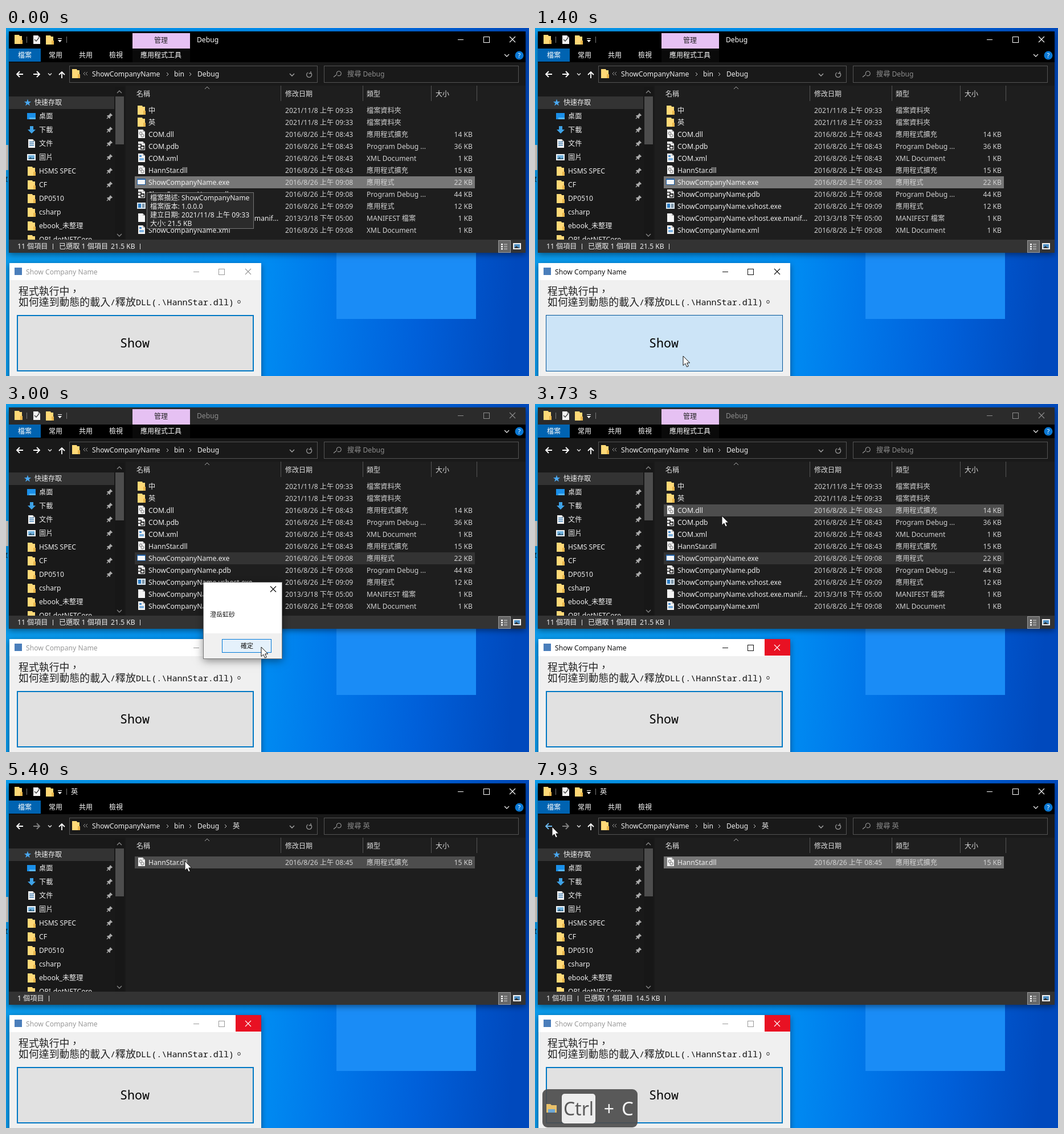
These frames come from a looping animation (918 by 610 pixels, 8 s). An HTML page with a canvas:

```html
<!DOCTYPE html>
<html lang="zh-Hant">
<head>
<meta charset="utf-8">
<title>Show Company Name</title>
<style>
html, body { margin: 0; width: 100%; height: 100%; overflow: hidden; background: #0078d7; }
canvas { display: block; }
</style>
</head>
<body>
<canvas id="stage" width="918" height="610"></canvas>
<script>
const ctx = document.getElementById('stage').getContext('2d');
const CJK = '"Noto Sans CJK TC", "Noto Sans CJK JP", "Noto Sans CJK", sans-serif';
const SANS = '"Noto Sans", ' + CJK;
const MONO = '"Noto Sans Mono", monospace';
const LOOP = 8000;

// ---------- drawing helpers ----------
function rect(x, y, w, h, color) {
  ctx.fillStyle = color;
  ctx.fillRect(x, y, w, h);
}
function outline(x, y, w, h, color, line = 1) {
  ctx.strokeStyle = color;
  ctx.lineWidth = line;
  ctx.strokeRect(x + line / 2, y + line / 2, w - line, h - line);
}
function rounded(x, y, w, h, r, color) {
  ctx.fillStyle = color;
  ctx.beginPath();
  ctx.roundRect(x, y, w, h, r);
  ctx.fill();
}
function disc(x, y, r, color) {
  ctx.fillStyle = color;
  ctx.beginPath();
  ctx.arc(x, y, r, 0, 7);
  ctx.fill();
}
function text(str, x, y, color = '#eee', size = 12.15, align = 'left', family = SANS) {
  ctx.font = `${size}px ${family}`;
  ctx.textAlign = align;
  ctx.fillStyle = color;
  ctx.fillText(str, x, y);
}
function at(x, y, draw) {
  ctx.save();
  ctx.translate(x, y);
  draw();
  ctx.restore();
}
function stroke(x, y, d, color, line = 1) {
  at(x, y, () => {
    ctx.strokeStyle = color;
    ctx.lineWidth = line;
    ctx.stroke(new Path2D(d));
  });
}
function fill(x, y, d, color) {
  at(x, y, () => {
    ctx.fillStyle = color;
    ctx.fill(new Path2D(d));
  });
}
function shadowed(x, y, w, h, color, blur = 10) {
  ctx.save();
  ctx.shadowColor = 'rgba(0,0,0,.45)';
  ctx.shadowBlur = blur;
  ctx.shadowOffsetY = 3;
  rect(x, y, w, h, color);
  ctx.restore();
}
const chevron = { down: 'M-4-2L0 2L4-2', up: 'M-4 2L0-2L4 2', right: 'M-2-3L1 0L-2 3' };

function windowButtons(xMin, xMax, xClose, y, color, closeColor = color) {
  stroke(xMin, y, 'M-5 .5H5', color);
  outline(xMax - 5, y - 5, 11, 11, color);
  stroke(xClose, y, 'M-5-5L5 5M5-5L-5 5', closeColor, 1.1);
}

// ---------- icons, placed by their top left corner (about 14 x 16) ----------
const page = (x, y) => {
  fill(x, y, 'M1 0H9L13 4V15H1Z', '#f4f4f4');
  fill(x, y, 'M9 0V4H13Z', '#b5b5b5');
};
const icons = {
  folder(x, y) {
    fill(x, y, 'M0 0H8L9 2H13V16H0Z', '#ffd977');
    fill(x, y, 'M10 9H14V16H10Z', '#e9b64d');
  },
  page,
  dll(x, y) {
    page(x, y);
    ctx.strokeStyle = '#999';
    ctx.lineWidth = 1.4;
    for (const [cx, cy, r] of [[5.5, 6.5, 2.2], [8.5, 10.5, 2.4]]) {
      ctx.beginPath();
      ctx.arc(x + cx, y + cy, r, 0, 7);
      ctx.stroke();
    }
  },
  pdb(x, y) {
    page(x, y);
    outline(x - 1, y + 4, 8, 7, '#222', 1.5);
    rect(x + 5, y + 7, 7, 7, '#222');
    rect(x + 6.5, y + 9, 4, 3.5, '#eee');
  },
  xml(x, y) {
    page(x, y);
    rect(x + 3, y + 3, 4, 3, '#4a8fd0');
    rect(x + 3, y + 8, 8, 4, '#7eb2e0');
  },
  exe(x, y) {
    rect(x - 1, y + 2, 15, 11, '#1d5fa8');
    rect(x, y + 4, 13, 8, '#f6f8fa');
  },
  host(x, y) {
    rect(x - 1, y + 2, 15, 11, '#d7e4ee');
    rect(x + 1, y + 4, 5, 7, '#2b7cc4');
    rect(x + 8, y + 4, 4, 7, '#7c93a5');
  },
  desk(x, y) {
    rect(x - 1, y + 2, 15, 11, '#1a8fe8');
    rect(x + 3, y + 10, 11, 3, '#56b6f7');
  },
  down(x, y) { fill(x, y, 'M4 1H10V7H14L7 14L0 7H4Z', '#3ea2e6'); },
  doc(x, y) {
    page(x, y);
    for (const row of [4, 7, 10]) rect(x + 3, y + row, 8, 1.5, '#4a86b8');
  },
  pic(x, y) {
    rect(x - 1, y + 2, 15, 11, '#eef4f8');
    rect(x + 1, y + 4, 11, 7, '#6fb0dd');
    fill(x, y, 'M1 11L5 7L8 10L10 8L12 11Z', '#34607c');
  }
};

// ---------- content ----------
const sidebar = [
  ['desk', '桌面'], ['down', '下載'], ['doc', '文件'], ['pic', '圖片'], ['folder', 'HSMS SPEC'],
  ['folder', 'CF'], ['folder', 'DP0510'], ['folder', 'csharp'], ['folder', 'ebook_未整理'], ['folder', 'QPI-dotNETCore']
];
const LIB = '應用程式擴充', DIR = '檔案資料夾', APP = '應用程式', DBG = 'Program Debug ...', XML = 'XML Document';
const debugFiles = [
  ['folder', '中', '2021/11/8 上午 09:33', DIR, ''],
  ['folder', '英', '2021/11/8 上午 09:33', DIR, ''],
  ['dll', 'COM.dll', '2016/8/26 上午 08:43', LIB, '14 KB'],
  ['pdb', 'COM.pdb', '2016/8/26 上午 08:43', DBG, '36 KB'],
  ['xml', 'COM.xml', '2016/8/26 上午 08:43', XML, '1 KB'],
  ['dll', 'HannStar.dll', '2016/8/26 上午 08:43', LIB, '15 KB'],
  ['exe', 'ShowCompanyName.exe', '2016/8/26 上午 09:08', APP, '22 KB'],
  ['pdb', 'ShowCompanyName.pdb', '2016/8/26 上午 09:08', DBG, '44 KB'],
  ['host', 'ShowCompanyName.vshost.exe', '2016/8/26 上午 09:09', APP, '12 KB'],
  ['page', 'ShowCompanyName.vshost.exe.manif...', '2013/3/18 下午 05:00', 'MANIFEST 檔案', '1 KB'],
  ['xml', 'ShowCompanyName.xml', '2016/8/26 上午 09:08', XML, '1 KB']
];
const englishFiles = [['dll', 'HannStar.dll', '2016/8/26 上午 08:45', LIB, '15 KB']];

// ---------- timeline ----------
const moves = [
  [70, 247, 512], [730, 247, 512], [1200, 260, 575], [1800, 260, 575], [2670, 449, 427], [2730, 448, 426],
  [3200, 448, 426], [3730, 328, 196], [4070, 305, 167], [5000, 305, 167], [5400, 314, 142],
  [6800, 314, 142], [7670, 33, 84], [7930, 30, 82]
];
function pointer(t) {
  const next = moves.findIndex(m => m[0] > t);
  if (next < 0) return moves.at(-1).slice(1);
  if (next === 0) return null;
  const [t0, x0, y0] = moves[next - 1], [t1, x1, y1] = moves[next];
  const u = (t - t0) / (t1 - t0), e = u * u * (3 - 2 * u);
  return [x0 + (x1 - x0) * e, y0 + (y1 - y0) * e];
}
const within = (t, from, to) => t >= from && t < to;

// ---------- scene parts ----------
function desktop() {
  const sky = ctx.createLinearGradient(0, 0, 918, 60);
  [[0, '#0a9cec'], [.5, '#008ff3'], [.65, '#0078ea'], [.82, '#0060da'], [1, '#0049bd']]
    .forEach(([stop, color]) => sky.addColorStop(stop, color));
  rect(0, 0, 918, 610, sky);
  rect(580, 265, 245, 245, '#1a8cf6');
  rect(0, 205, 4, 44, '#d8cfc6');
  text('改', -9, 269, '#111');
}

function explorer(t, mouse) {
  const inside = t >= 4930, active = t < 1470 || t >= 4730;
  const tone = active ? '#fff' : '#8d8d8d';
  shadowed(5, 6, 907, 388, '#191919');
  rect(5, 6, 907, 54, '#000');
  if (!active) rect(5, 6, 907, 30, '#2b2b2b');

  // title bar and ribbon
  icons.folder(15, 12);
  page(47, 13);
  stroke(50, 20, 'M0 0L3 3L8-3', '#444', 1.4);
  icons.folder(70, 13);
  stroke(0, 0, 'M36.5 15V26M106.5 15V26', '#777');
  stroke(0, 0, 'M91 18.5H98', '#fff');
  fill(94.5, 21, 'M-3.5 0H3.5L0 4Z', '#fff');
  if (inside) {
    text('英', 114, 25, tone);
  } else {
    rect(222, 9, 101, 27, '#e6c1f3');
    text('管理', 272, 26, '#222', 12, 'center');
    text('Debug', 335, 25, tone);
    rect(222, 36, 101, 24, '#0a0a0a');
    text('應用程式工具', 236, 52, '#fff', 12);
  }
  windowButtons(798, 843, 889, 20, tone);
  rect(5, 36, 56, 23, '#0063b1');
  ['檔案', '常用', '共用', '檢視'].forEach((tab, i) => text(tab, [33, 87, 140, 193][i], 52, '#fff', 12, 'center'));
  stroke(879, 48, chevron.down, '#ddd', 1.4);
  disc(901, 48, 7.5, '#0a78d4');
  text('?', 901, 52, '#fff', 11, 'center');

  // navigation row
  const onBack = mouse && mouse[1] < 100 && mouse[0] < 37;
  stroke(24, 81, 'M6 0H-5M0-5L-5 0L0 5', onBack ? '#6cb8ee' : '#fff', 1.8);
  stroke(54, 81, 'M-6 0H5M0-5L5 0L0 5', inside ? '#808080' : '#fff', 1.8);
  stroke(77, 81, 'M-3-1.5L0 1.5L3-1.5', '#ddd', 1.5);
  stroke(98, 82, 'M0 6V-5M-5 0L0-5L5 0', '#fff', 1.8);
  outline(111, 66, 436, 30, '#535353');
  outline(558, 66, 342, 30, '#535353');
  icons.folder(116, 72);
  stroke(139, 80, 'M0-3L-3 0L0 3M4-3L1 0L4 3', '#999');
  text('ShowCompanyName', 151, 85);
  stroke(284, 81, chevron.right, '#ccc');
  text('bin', 295, 85);
  stroke(324, 81, chevron.right, '#ccc');
  text('Debug', 336, 85);
  if (inside) {
    stroke(386, 81, chevron.right, '#ccc');
    text('英', 398, 85);
  }
  stroke(502, 82, chevron.down, '#aaa', 1.3);
  stroke(532, 82, 'M3-3.5A4.5 4.5 0 1 1-2-4M3-6V-2.5H-.5', '#999', 1.3);
  stroke(580, 80, 'M1 2A4 4 0 1 1 2 3M0 2L-5 6', '#999', 1.1);
  text(inside ? '搜尋 英' : '搜尋 Debug', 599, 85, '#8c8c8c');

  sidePane();
  fileList(inside ? englishFiles : debugFiles, t, active, mouse);
  statusBar(inside, t);
}

function sidePane() {
  rect(5, 120, 185, 22, '#333');
  const star = Array.from({ length: 10 }, (_, i) => {
    const r = i % 2 ? 2.6 : 6.5, a = (i / 5 - .5) * Math.PI;
    return `${r * Math.cos(a)} ${r * Math.sin(a)}`;
  });
  fill(38, 131, `M${star.join('L')}Z`, '#4aa8f0');
  text('快速存取', 50, 135, '#eee', 12);
  ctx.save();
  ctx.beginPath();
  ctx.rect(5, 101, 204, 270);
  ctx.clip();
  sidebar.forEach(([icon, label], i) => {
    const y = 154 + 24 * i;
    icons[icon](38, y - 7);
    text(label, 58, y + 4.5);
    if (i < 7) {
      fill(182, y, 'M1-5L5-1L4 0L3 0L1 2L1 4L0 5L-5 0L-4-1L-2-1L0-3Z', '#aaa');
      stroke(182, y, 'M-2 2L-5 5', '#aaa', 1.2);
    }
  });
  ctx.restore();
  rect(191, 103, 17, 268, '#171717');
  rect(192, 120, 15, 84, '#4d4d4d');
  stroke(199, 112, chevron.up, '#888', 1.3);
  stroke(199, 363, chevron.down, '#888', 1.3);
}

function fileList(files, t, active, mouse) {
  rect(210, 101, 702, 270, '#1e1e1e');
  [['名稱', 229], ['修改日期', 490], ['類型', 633], ['大小', 754]]
    .forEach(([label, x]) => text(label, x, 119.5, '#ddd', 12));
  for (const x of [483, 627, 747, 827]) rect(x - 1, 101, 1, 27, '#555');
  stroke(353, 105, chevron.up, '#aaa');

  const selected = files === englishFiles ? (t >= 5870 ? 0 : -1) : t >= 4730 ? 1 : 6;
  const hovered = mouse && mouse[0] > 226 && mouse[0] < 823 ? Math.floor((mouse[1] - 133.5) / 21) : -1;
  files.forEach(([icon, name, date, type, size], i) => {
    const y = 144 + 21 * i, base = y + 4.5;
    if (i === selected) {
      rect(226, y - 10, 597, 21, active ? '#777' : '#333');
    } else if (i === hovered) {
      rect(226, y - 10, 597, 21, '#4d4d4d');
    }
    icons[icon](231, y - 8);
    text(name, 250, base);
    text(date, 490, base, '#d2d2d2');
    text(type, 633, base, '#d2d2d2');
    text(size, 819, base, '#d2d2d2', 12.15, 'right');
  });
}

function statusBar(inside, t) {
  rect(5, 371, 907, 23, '#333');
  const shift = inside ? -7 : 0;
  text(inside ? '1 個項目' : '11 個項目', 20, 387);
  rect(82 + shift, 378, 1, 10, '#ddd');
  if (!inside || t >= 5870) {
    text('已選取 1 個項目', 93 + shift, 387);
    text(inside ? '14.5 KB' : '21.5 KB', 184 + shift, 387);
    rect(235 + shift, 378, 1, 10, '#ddd');
  }
  rect(864, 372, 22, 22, '#666');
  outline(864, 372, 22, 22, '#999');
  for (const y of [378, 382, 386]) {
    rect(869, y, 3, 2.5, '#fff');
    rect(874, y, 6, 2.5, '#999');
  }
  rect(890, 377, 14, 11, '#f2f2f2');
  rect(892, 379, 10, 7, '#4d8fc4');
  fill(892, 386, 'M0 0L4-4L6-2L10 0Z', '#333');
}

function tooltip() {
  rect(247, 288, 188, 64, '#2b2b2b');
  outline(247, 288, 188, 64, '#767676');
  ['檔案描述: ShowCompanyName', '檔案版本: 1.0.0.0', '建立日期: 2021/11/8 上午 09:33', '大小: 21.5 KB']
    .forEach((line, i) => text(line, 253, 301.5 + 15 * i));
}

function appWindow(t) {
  const active = within(t, 1400, 1600) || within(t, 3070, 4670);
  const tone = active ? '#111' : '#999', red = t >= 3270;
  shadowed(6, 412, 442, 210, '#f0f0f0');
  rect(6, 412, 442, 30, '#fff');
  rect(15, 420, 13, 13, '#4a7ebb');
  text('Show Company Name', 35, 431.5, tone);
  if (red) rect(403, 412, 45, 29, '#e81123');
  windowButtons(334, 378, 425, 427, tone, red ? '#fff' : tone);

  text('程式執行中，', 22, 468, '#222', 17.9, 'left', CJK);
  text('如何達到動態的載入', 22, 486.5, '#222', 17.9, 'left', CJK);
  text('/', 183, 486, '#111', 15.1, 'left', MONO);
  text('釋放', 192, 486.5, '#222', 17.9, 'left', CJK);
  text('DLL(.\\HannStar.dll)', 228, 486, '#111', 15.1, 'left', MONO);
  text('。', 400, 486.5, '#222', 17.9, 'left', CJK);

  const pressed = within(t, 1400, 1530), hover = within(t, 930, 1600);
  rect(19, 503, 416, 99, pressed ? '#cce4f7' : hover ? '#e5f1fb' : '#e1e1e1');
  outline(19, 503, 416, 99, pressed ? '#005499' : '#0078c4', hover ? 1 : 2);
  text('Show', 226, 560, '#000', 21.7, 'center', MONO);
}

function messageBox(t) {
  shadowed(346, 312, 139, 135, '#f0f0f0', 14);
  rect(346, 312, 139, 90, '#fff');
  outline(346, 312, 139, 135, '#777');
  stroke(469, 324.5, 'M-5-5L5 5M5-5L-5 5', '#111', 1.2);
  text('澄岳虹砂', 358, 373, '#111', 11);
  const hover = t >= 2530;
  rect(379, 412, 87, 24, hover ? '#e5f1fb' : '#e1e1e1');
  outline(379, 412, 87, 24, '#0078d7', hover ? 1 : 2);
  text('確定', 423, 427.5, '#111', 11, 'center');
}

function keyOverlay(t) {
  ctx.globalAlpha = Math.min(1, (t - 5930) / 200);
  rounded(13, 542, 167, 67, 9, 'rgba(78,78,78,.92)');
  at(20, 568, () => {
    fill(0, 0, 'M0 0H7L9 2H18V15H0Z', '#e8c06a');
    rect(3, 9, 12, 6, '#6fa8d4');
  });
  rounded(47, 550, 59, 52, 5, '#ededed');
  text('Ctrl', 76.5, 588, '#5a5a5a', 32, 'center');
  text('+', 130, 588, '#f4f4f4', 32, 'center');
  text('C', 162.5, 588, '#f4f4f4', 33, 'center');
  ctx.globalAlpha = 1;
}

function cursor([x, y]) {
  const arrow = 'M0 0V16.5L3.8 13L6.5 19L9.3 17.8L6.7 12H11.7Z';
  fill(x, y, arrow, '#fff');
  stroke(x, y, arrow, '#111');
}

function draw(t) {
  const mouse = pointer(t);
  desktop();
  explorer(t, mouse);
  if (t < 70) tooltip();
  appWindow(t);
  if (within(t, 1600, 3070)) messageBox(t);
  if (t >= 6000) keyOverlay(t);
  if (mouse) cursor(mouse);
}

let lastTick = -1;
const start = performance.now();
function loop() {
  const tick = Math.floor(((performance.now() - start) % LOOP + 4) * .015);
  if (tick !== lastTick) {
    lastTick = tick;
    draw(Math.round(tick / .15) * 10);
  }
  requestAnimationFrame(loop);
}
loop();
</script>
</body>
</html>
```
